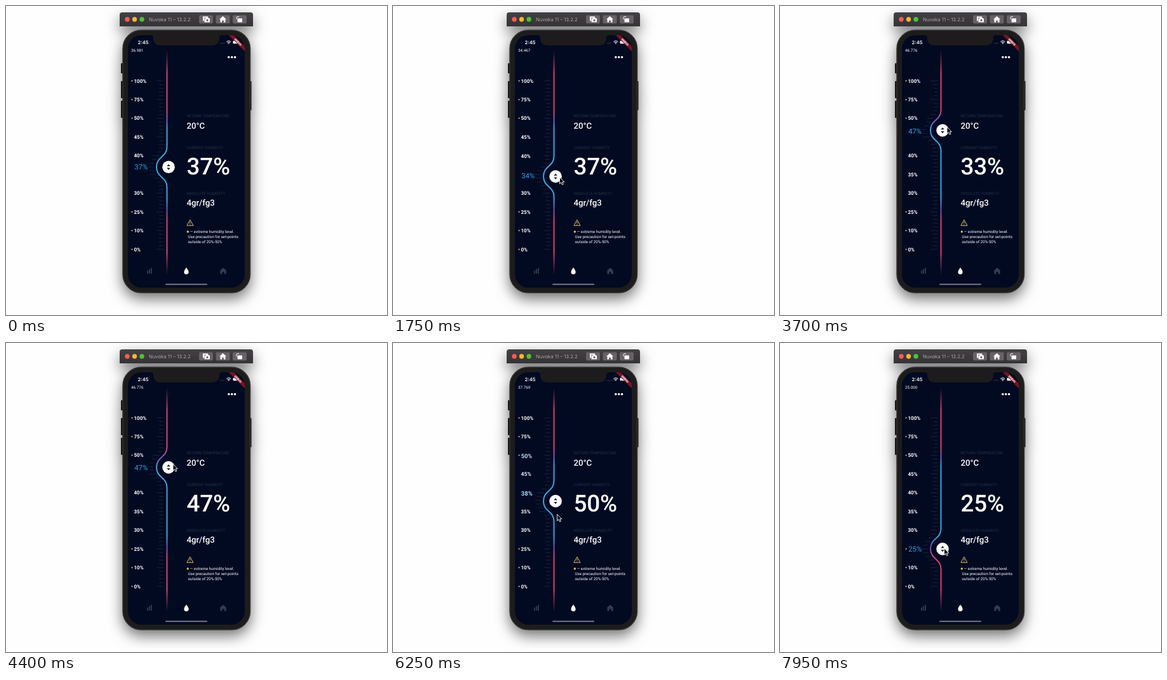
Animation of 600x486 px, one loop 8 s. Source, as an HTML page:

```html
<!DOCTYPE html>
<html lang="en">
<head>
<meta charset="utf-8">
<title>Humidity slider</title>
<style>
  html, body { margin: 0; width: 100%; height: 100%; overflow: hidden; background: #fefeff; }
  svg { display: block; width: 600px; height: 486px; }
  text { font-family: Roboto, sans-serif; fill: #fff; text-rendering: geometricPrecision; white-space: pre; }
  .title { font: 7.7px Inter, sans-serif; fill: #aaa8ab; }
  .clock { font: 600 7.6px Inter, sans-serif; }
  .caption { font-size: 6.2px; fill: #293049; }
  .fact { font-size: 13.2px; font-weight: 500; }
  .big { font-size: 36.8px; font-weight: 500; }
  .note { font-size: 6.2px; }
  .debug { font-size: 4.4px; font-weight: 900; text-anchor: middle; }
</style>
</head>
<body>
<svg viewBox="0 0 600 486" xmlns="http://www.w3.org/2000/svg">
  <defs>
    <filter id="shadow" x="-30%" y="-20%" width="160%" height="145%">
      <feDropShadow dx="0" dy="9" stdDeviation="11" flood-color="#000" flood-opacity=".55"/>
    </filter>
    <linearGradient id="bar" x2="0" y2="1">
      <stop stop-color="#434144"/><stop offset="1" stop-color="#353336"/>
    </linearGradient>
    <linearGradient id="heat" gradientUnits="userSpaceOnUse" x1="0" y1="70" x2="0" y2="423">
      <stop offset="0" stop-color="#d8426b" stop-opacity="0"/>
      <stop offset=".1" stop-color="#d8426b"/>
      <stop offset=".27" stop-color="#d8426b"/>
      <stop offset=".31" stop-color="#7656b4"/>
      <stop offset=".35" stop-color="#32a9df"/>
      <stop offset=".66" stop-color="#32a9df"/>
      <stop offset=".71" stop-color="#6a4fae"/>
      <stop offset=".755" stop-color="#d8426b"/>
      <stop offset=".9" stop-color="#d8426b"/>
      <stop offset="1" stop-color="#d8426b" stop-opacity="0"/>
    </linearGradient>
    <clipPath id="screen"><rect x="192" y="46" width="184" height="397" rx="21"/></clipPath>
  </defs>

  <g filter="url(#shadow)">
    <path d="M179 32V14q0-4 4-4H385q4 0 4 4V32Z" fill="url(#bar)"/>
    <g fill="#171617">
      <rect x="181" y="90" width="5" height="16" rx="1"/>
      <rect x="181" y="118" width="5" height="27" rx="1"/>
      <rect x="181" y="149" width="5" height="27" rx="1"/>
      <rect x="383" y="118" width="3.5" height="46" rx="1"/>
    </g>
    <rect x="184" y="38" width="200.5" height="413" rx="29" fill="#1d1b1c" stroke="#353335" stroke-width="1.5"/>
  </g>

  <circle cx="191" cy="21" r="3.7" fill="#fc5b55"/>
  <circle cx="202.5" cy="21" r="3.7" fill="#f5b92f"/>
  <circle cx="214" cy="21" r="3.7" fill="#4fc235"/>
  <text class="title" x="225" y="24">Nuvoka 11 – 13.2.2</text>
  <g fill="#656366">
    <rect x="304" y="14.5" width="22" height="13" rx="2"/>
    <rect x="330.5" y="14.5" width="22" height="13" rx="2"/>
    <rect x="357" y="14.5" width="22" height="13" rx="2"/>
  </g>
  <g fill="#fff">
    <path d="M310 16.5h8v2h-6v5h-2Z"/>
    <path d="M312.5 19.5h2l1-1.2h3l1 1.2h1.5v6h-8.5Z"/>
    <circle cx="317" cy="22.4" r="1.6" fill="#656366"/>
    <path d="M341.5 16l5.5 5h-1.5v4.7h-2.6v-3h-2.8v3h-2.6V21H336Z"/>
    <rect x="364.5" y="19.5" width="7.5" height="6" rx=".8"/>
    <path d="M363 21v-2.5q0-1.8 2-1.8h2" fill="none" stroke="#fff"/>
  </g>

  <g clip-path="url(#screen)">
    <rect x="192" y="46" width="184" height="397" fill="#020a22"/>
    <path d="M228 46q4 0 4 4q0 12 12 12h80q12 0 12-12q0-4 4-4Z" fill="#1d1b1c"/>
    <text class="clock" x="207.5" y="60">2:45</text>
    <path d="M337 58.7h7" stroke="#4a4f63" stroke-dasharray="1.2 .8"/>
    <g fill="none" stroke="#fff" stroke-width="1.1">
      <path d="M347.4 56.3q3.4-3 6.8 0M348.8 57.8q2-1.7 4 0"/>
    </g>
    <circle cx="350.8" cy="59.1" r=".8" fill="#fff"/>
    <rect x="357.5" y="54.8" width="9" height="4.4" rx="1" fill="#fff"/>
    <g transform="translate(376 46) rotate(45)">
      <rect x="-17.8" y="12.4" width="35.6" height="5.4" fill="#8d1522" fill-opacity=".9"/>
      <text class="debug" y="16.7">DEBUG</text>
    </g>

    <g fill="#fff">
      <circle cx="350.8" cy="80.5" r="1.75"/>
      <circle cx="355.7" cy="80.5" r="1.75"/>
      <circle cx="360.6" cy="80.5" r="1.75"/>
    </g>
    <text id="readout" x="197" y="71.7" font-size="6.3"></text>

    <path id="ticks" stroke="#222b46" stroke-width=".8"/>
    <g id="labels"></g>
    <path id="curve" fill="none" stroke="url(#heat)" stroke-width="2"/>
    <g id="knob">
      <circle r="9.8" fill="#fff"/>
      <path d="M-2.8-1.3L0-4.6 2.8-1.3ZM-2.8 1.3L0 4.6 2.8 1.3Z" fill="#1b2138"/>
    </g>

    <text class="caption" x="284.5" y="174.5">RETURN TEMPERATURE</text>
    <text class="fact" x="284.5" y="192.7">20°C</text>
    <text class="caption" x="284.5" y="224.7">CURRENT HUMIDITY</text>
    <g id="digits"></g>
    <text class="big" x="326" y="264.5">%</text>
    <text class="caption" x="284.5" y="296.5">ABSOLUTE HUMIDITY</text>
    <text class="fact" x="284.5" y="314.3">4gr/fg3</text>

    <g fill="none" stroke="#e3bd62" stroke-linejoin="round">
      <path d="M289.9 336.3L294.9 345.3H284.9Z"/>
      <path d="M289.9 339.3v2.8M289.9 343v1"/>
    </g>
    <circle cx="286.3" cy="355" r="1.7" fill="#eebd52"/>
    <text class="note" x="289.5" y="357.3">— extreme humidity level.</text>
    <text class="note" x="286.5" y="365.3">Use precaution for set-points</text>
    <text class="note" x="286.5" y="373.3">outside of 20%-50%</text>

    <g fill="#343b57">
      <path d="M222 416h1.8v5H222ZM225 413.8h1.8v7.2H225ZM228 412h1.8v9H228Z"/>
      <path d="M342 411.8l4.6 4v5.7h-3v-3.2h-3.2v3.2h-3v-5.7Z"/>
    </g>
    <path d="M284 411.5q3.6 4.4 3.6 7a3.6 3.6 0 0 1-7.2 0q0-2.6 3.6-7Z" fill="#fff"/>
    <rect x="251" y="436.7" width="66" height="2" rx="1" fill="#737686"/>
  </g>

  <path id="cursor" d="M0 0V10.2L2.4 8 4 11.6 5.8 10.8 4.2 7.3H7.4Z" fill="#000" stroke="#fff" stroke-width=".9"/>
</svg>

<script>
const LOOP = 8000, FRAME = 50, SWAP = 300;
const TOP = 117.7, GAP = 29.45, LINE_X = 253.5, BULGE = 16.5, REACH = 32;
const STOPS = [100, 75, 50, 45, 40, 35, 30, 25, 10, 0];
const DOTTED = [100, 75, 50, 25, 10, 0];

// [ms, humidity]
const VALUE = [[0, 36.981], [780, 36.981], [1100, 41.5], [1450, 35.2], [1750, 34.467],
  [2150, 32.891], [2900, 32.891], [3550, 46.776], [4450, 46.776], [4900, 50],
  [6080, 50], [6250, 37.769], [6500, 31], [7250, 25], [8000, 25]];
// [ms, x, y]
const POINTER = [[50, 448, 300], [350, 340, 272], [700, 262, 254], [800, 262, 254],
  [1100, 262, 228], [1450, 262, 265], [1750, 262.5, 269.5], [2150, 263, 276.5], [2900, 263, 276.5],
  [3550, 263, 190.5], [4450, 263, 190.5], [4900, 261, 170], [6040, 260, 170],
  [6250, 258.5, 269.5], [6500, 258, 290], [7250, 258.5, 323], [8000, 258.5, 323]];
// [ms, released humidity]
const RELEASED = [[-SWAP, 37], [2250, 33], [4000, 47], [5400, 50], [7650, 25]];

const $ = id => document.getElementById(id);
const clamp = (v, lo, hi) => Math.min(hi, Math.max(lo, v));
const stopY = i => TOP + GAP * i;

function add(parent, tag, attrs) {
  const el = document.createElementNS("http://www.w3.org/2000/svg", tag);
  return parent.appendChild(set(el, attrs));
}
function set(el, attrs) {
  for (const name in attrs) el.setAttribute(name, attrs[name]);
  return el;
}

// Monotone cubic interpolation through the given keys
function sample(keys, t, col = 1) {
  const last = keys.length - 1;
  if (t <= keys[0][0]) return keys[0][col];
  if (t >= keys[last][0]) return keys[last][col];
  const i = keys.findIndex(k => k[0] > t) - 1;
  const slope = j => j < 0 || j >= last ? 0 : (keys[j + 1][col] - keys[j][col]) / (keys[j + 1][0] - keys[j][0]);
  const tangent = j => {
    const a = slope(j - 1), b = slope(j);
    return a * b > 0 ? 2 * a * b / (a + b) : 0;
  };
  const h = keys[i + 1][0] - keys[i][0], u = (t - keys[i][0]) / h, w = 1 - u;
  return keys[i][col] * (1 + 2 * u) * w * w + keys[i + 1][col] * u * u * (3 - 2 * u)
    + h * u * w * (tangent(i) * w - tangent(i + 1) * u);
}

function valueToY(value) {
  const i = clamp(STOPS.findIndex(s => s <= value), 1, STOPS.length - 1);
  return stopY(i - (value - STOPS[i]) / (STOPS[i - 1] - STOPS[i]));
}
const knobAt = t => valueToY(sample(VALUE, Math.max(0, t)));
const nearest = y => clamp(Math.round((y - TOP) / GAP), 0, STOPS.length - 1);

const labels = STOPS.map((stop, i) => {
  if (DOTTED.includes(stop)) add($("labels"), "circle", { cx: 198.5, cy: stopY(i), r: 1, fill: "#f0d489" });
  return add($("labels"), "text", {});
});
const digits = [0, 1].map(i => [0, 1].map(() => add($("digits"), "text", { class: "big", x: 284.5 + i * 20.7 })));

function drawLabels(t, value) {
  const shift = STOPS.map(() => 0), glow = STOPS.map(() => 0);
  let total = 0;
  for (let age = 0; age <= 900; age += 15) {
    const y = knobAt(t - age), i = nearest(y), weight = Math.exp(-age / 120);
    total += weight;
    shift[i] += weight * (y - stopY(i));
    glow[i] += weight;
  }
  const active = nearest(valueToY(value));
  labels.forEach((label, i) => {
    const g = glow[i] / total, size = 8 + 3.4 * g;
    const mix = (from, to) => Math.round(from + (to - from) * g);
    label.textContent = (i === active ? Math.round(value) : STOPS[i]) + "%";
    set(label, {
      x: 201.5 + .7 * g,
      y: stopY(i) + shift[i] / total + size * .36,
      "font-size": size,
      "font-weight": g > .6 ? 400 : 700,
      style: `fill:rgb(${mix(255, 47)},${mix(255, 160)},${mix(255, 226)})`
    });
  });
}

function drawScale(y) {
  let path = "";
  for (let n = 0; n <= 45; n++) {
    const ty = TOP + n * GAP / 5, d = clamp(Math.abs(ty - y) / REACH, 0, 1);
    const end = 248 - BULGE * (1 + Math.cos(Math.PI * d)) / 2;
    path += `M${end - (n % 5 ? 7 : 10.5)} ${ty}H${end}`;
  }
  $("ticks").setAttribute("d", path);
  const peak = LINE_X - BULGE;
  $("curve").setAttribute("d", `M${LINE_X} 70V${y - REACH}C${LINE_X} ${y - 15} ${peak} ${y - 17} ${peak} ${y}`
    + `S${LINE_X} ${y + 15} ${LINE_X} ${y + REACH}V423`);
  $("knob").setAttribute("transform", `translate(256 ${y})`);
}

function drawDigits(t) {
  const now = RELEASED.findLastIndex(r => r[0] <= t);
  const next = String(RELEASED[now][1]), prev = String(RELEASED[Math.max(0, now - 1)][1]);
  const u = clamp((t - RELEASED[now][0]) / SWAP, 0, 1), p = u * u * (3 - 2 * u);
  digits.forEach(([out, into], i) => {
    const q = next[i] === prev[i] ? 1 : p;
    out.textContent = prev[i];
    into.textContent = next[i];
    set(out, { y: 264.5 + 18 * q, opacity: 1 - q });
    set(into, { y: 264.5 - 18 * (1 - q), opacity: q });
  });
}

function draw(t) {
  const value = sample(VALUE, t);
  $("readout").textContent = value.toFixed(3);
  drawScale(valueToY(value));
  drawLabels(t, value);
  drawDigits(t);
  set($("cursor"), {
    transform: `translate(${sample(POINTER, t, 1)} ${sample(POINTER, t, 2)})`,
    visibility: t < POINTER[0][0] ? "hidden" : "visible"
  });
}

const start = performance.now();
function tick() {
  const t = Math.max(0, performance.now() - start) % LOOP;
  draw(Math.floor(t / FRAME) * FRAME);
  requestAnimationFrame(tick);
}
tick();
</script>
</body>
</html>
```
